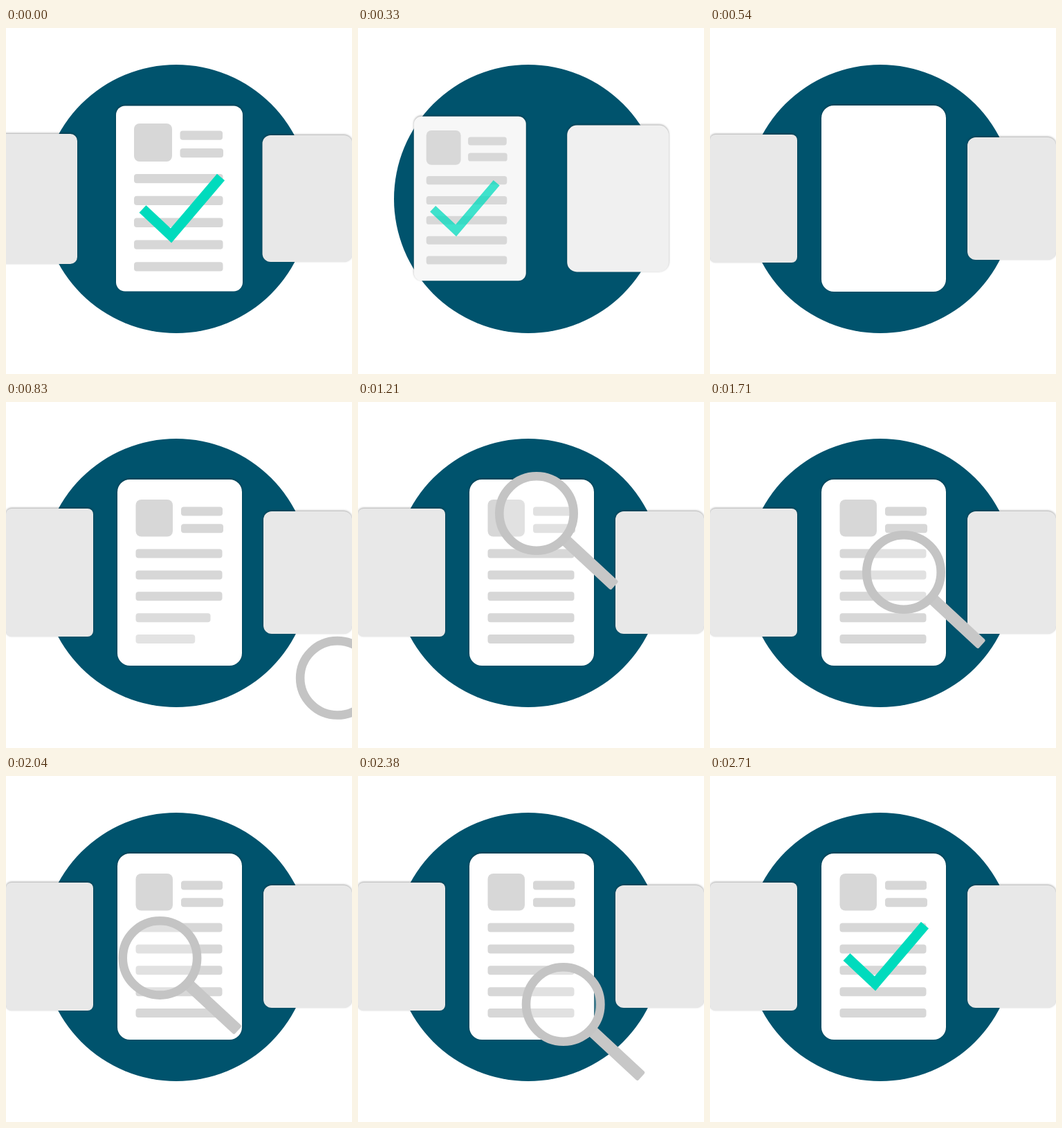
An HTML page with a canvas that plays this animation: 500x500 px, repeating every 3 s.

```html
<!DOCTYPE html>
<html lang="en">
<head>
<meta charset="utf-8">
<title>Document review</title>
<style>
  html, body { margin: 0; width: 100%; height: 100%; overflow: hidden; background: #fff; }
  canvas { display: block; width: 500px; height: 500px; }
</style>
</head>
<body>
<canvas id="stage" width="500" height="500"></canvas>
<script>
const ctx = document.getElementById('stage').getContext('2d');
const LOOP = 3000;
const SLIDE_END = 540;
const GREY = 232;

const clamp = v => Math.min(1, Math.max(0, v));
const lerp = (a, b, p) => a + (b - a) * p;
const span = (t, from, to) => clamp((t - from) / (to - from));
const smooth = p => p * p * (3 - 2 * p);
const bezier = (a, b, c, d, p) => {
  const r = 1 - p;
  return a * r * r * r + 3 * b * r * r * p + 3 * c * r * p * p + d * p * p * p;
};

function roundRect(x, y, w, h, r) {
  if (w <= 0) return;
  ctx.beginPath();
  ctx.roundRect(x, y, w, h, Math.min(r, w / 2));
  ctx.fill();
}

function card({ x, y = 246.5, w, h, r, shade = GREY }) {
  ctx.save();
  ctx.shadowColor = 'rgba(0,0,0,0.35)';
  ctx.shadowBlur = 3;
  ctx.shadowOffsetY = -1;
  const c = Math.round(shade);
  ctx.fillStyle = `rgb(${c},${c},${c})`;
  roundRect(x - w / 2, y - h / 2, w, h, r);
  ctx.restore();
}

function mixCards(a, b, p, sizeP) {
  return {
    x: lerp(a.x, b.x, p),
    w: lerp(a.w, b.w, sizeP),
    h: lerp(a.h, b.h, sizeP),
    r: lerp(a.r, b.r, sizeP),
    shade: lerp(a.shade ?? GREY, b.shade ?? GREY, sizeP)
  };
}

const leftCard = { x: 63, w: 126, h: 185, r: 8 };
const rightCard = { x: 436, w: 128, h: 177, r: 12 };
const checkedCard = { x: 250.5, w: 183, h: 268, r: 13, shade: 255 };
const freshCard = { x: 251, w: 180, h: 269, r: 18, shade: 255 };

const checkedPage = { x: 185, y: 138, box: 55, headX: 251.5, headY: 148.5, headGap: 25.5,
                      headW: 61.5, rowY: 211, rowGap: 31.8, rowW: 128.5, bar: 13.3 };
const freshPage = { x: 187.5, y: 141, box: 53.5, headX: 253, headY: 151.5, headGap: 24.7,
                    headW: 60, rowY: 212.5, rowGap: 30.9, rowW: 125, bar: 13 };

// grow(index) gives how far each block of the page has been written.
function page(p, grow) {
  let index = 0;
  const block = (x, y, w, h, r) => {
    const g = grow(index++);
    ctx.save();
    ctx.globalAlpha *= g;
    ctx.fillStyle = '#d7d7d7';
    roundRect(x, y, w * g, h, r);
    ctx.restore();
  };
  block(p.x, p.y, p.box, p.box, 8);
  for (let i = 0; i < 2; i++) block(p.headX, p.headY + i * p.headGap, p.headW + i, p.bar, 4);
  for (let i = 0; i < 5; i++) block(p.x, p.rowY + i * p.rowGap, p.rowW, p.bar, 4);
}

function check(progress) {
  if (progress <= 0) return;
  const total = Math.hypot(41, 38) + Math.hypot(72, 84);
  ctx.save();
  ctx.strokeStyle = '#00dbbd';
  ctx.lineWidth = 14.5;
  if (progress < 1) ctx.setLineDash([total * progress, total * 2]);
  ctx.beginPath();
  ctx.moveTo(197.5, 261.5);
  ctx.lineTo(238.5, 300);
  ctx.lineTo(310.5, 215.5);
  ctx.stroke();
  ctx.restore();
}

// Draws around a pivot that is shifted sideways and scaled.
function around(px, py, dx, scale, alpha, draw) {
  ctx.save();
  ctx.translate(px + dx, py);
  ctx.scale(scale, scale);
  ctx.translate(-px, -py);
  ctx.globalAlpha = alpha;
  draw();
  ctx.restore();
}

function magnifier(x, y) {
  ctx.save();
  ctx.translate(x, y);
  ctx.save();
  ctx.rotate(Math.atan2(64, 69));
  ctx.fillStyle = '#c7c7c7';
  roundRect(56, -8.5, 98, 17, 2.5);
  ctx.restore();
  ctx.beginPath();
  ctx.arc(0, 0, 53.7, 0, Math.PI * 2);
  ctx.fillStyle = 'rgba(255,255,255,0.25)';
  ctx.fill();
  ctx.strokeStyle = '#c4c4c4';
  ctx.lineWidth = 12.6;
  ctx.stroke();
  ctx.restore();
}

function magnifierAt(t) {
  if (t < 740 || t > 2660) return null;
  if (t < 1210) {
    const away = 231 * Math.pow(Math.max(0, 1000 - t) / 170, 1.6);
    return [250 + away, 170 + away];
  }
  if (t < 1860) {
    const p = smooth(span(t, 1210, 1710));
    return [bezier(258, 135, 315, 280, p), bezier(161, 165, 280, 246, p)];
  }
  if (t < 2390) {
    const p = smooth(span(t, 1860, 2380));
    return [bezier(280, 143, 290, 296.7, p), bezier(246, 250, 325, 330, p)];
  }
  const away = 290 * Math.pow(span(t, 2390, 2650), 1.7);
  return [296.7 + away, 330 + away];
}

function slide(t) {
  const q = smooth(Math.pow(t / SLIDE_END, 1.7));
  const turn = Math.PI / 3;
  const leave = Math.sin(q * turn) / Math.sin(turn);
  const arrive = 1 - Math.sin((1 - q) * turn) / Math.sin(turn);

  card({ ...leftCard, x: 39 - 110 * clamp(q / 0.35), y: 247, w: 128, h: 188, r: 10 });
  if (q > 0.4) card({ ...rightCard, x: lerp(570, 436, span(q, 0.4, 1)) });
  card(mixCards({ ...rightCard, x: 435.5, w: 130, h: 183 }, freshCard, arrive, Math.pow(q, 1.2)));

  const moving = mixCards(checkedCard, leftCard, leave, Math.pow(q, 1.1));
  card(moving);
  const dx = moving.x - checkedCard.x;
  around(249.5, 244.5, dx * 1.04, 1 - 0.23 * q, 1 - q ** 3, () => page(checkedPage, () => 1));
  around(254, 260, dx * 1.125, 1 - 0.46 * q, 1 - q ** 1.5, () => check(1));
}

function review(t) {
  card(leftCard);
  card(rightCard);
  card(freshCard);
  page(freshPage, i => span(t, 560 + i * 25, 700 + i * 25));
  check(smooth(span(t, 2430, 2710)));
  const spot = magnifierAt(t);
  if (spot) magnifier(...spot);
}

function render(t) {
  ctx.fillStyle = '#fff';
  ctx.fillRect(0, 0, 500, 500);
  ctx.fillStyle = '#00536d';
  ctx.beginPath();
  ctx.arc(246, 247, 194, 0, Math.PI * 2);
  ctx.fill();
  if (t < SLIDE_END) slide(t);
  else review(t);
}

const start = performance.now();
function frame() {
  render((performance.now() - start) % LOOP);
  requestAnimationFrame(frame);
}
frame();
</script>
</body>
</html>
```
